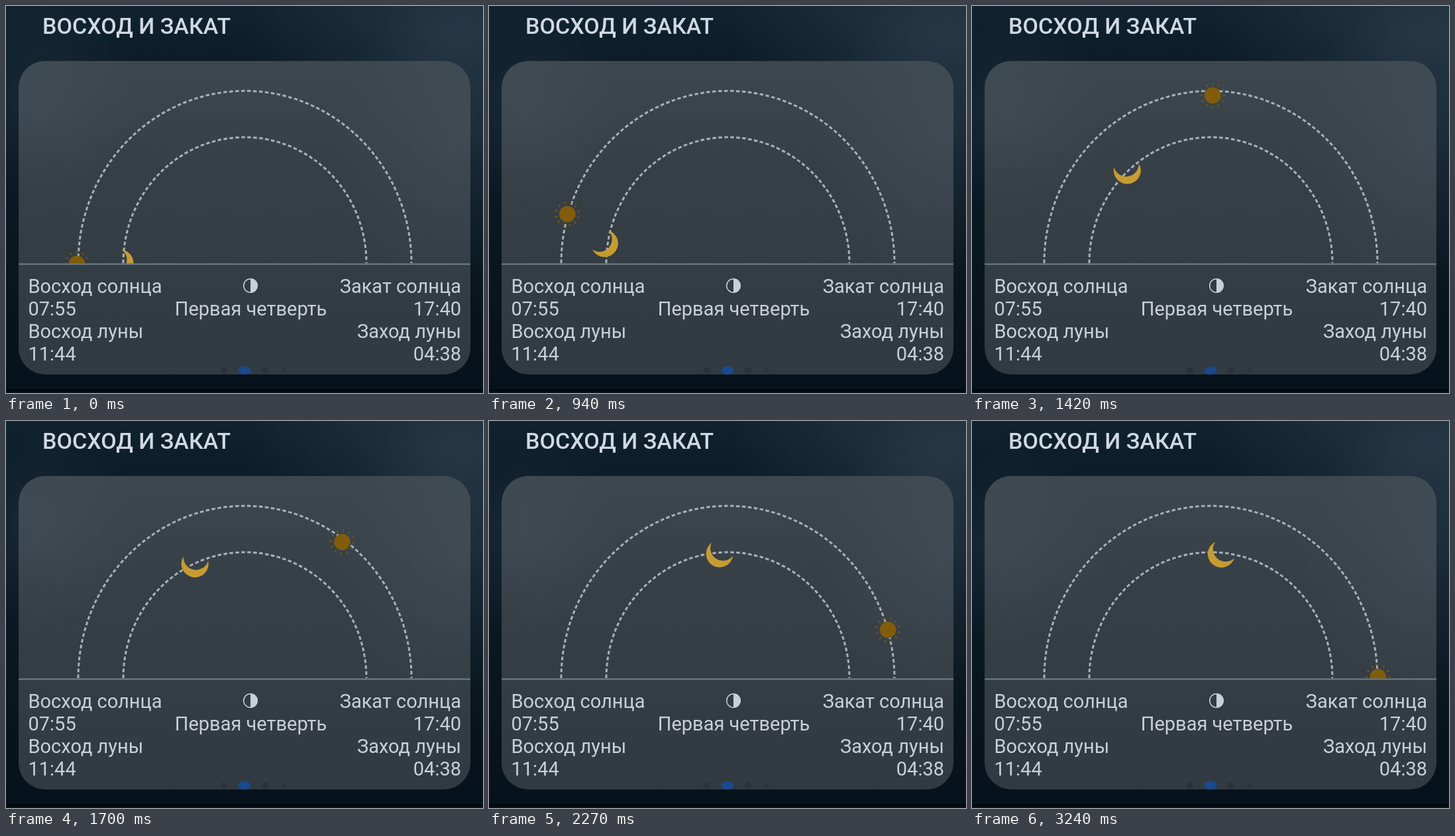
Recreate the animation shown at these times as an HTML page. Size 720 px wide and 584 px high, loop 3270 ms.

```html
<!DOCTYPE html>
<html lang="ru">
<head>
<meta charset="utf-8">
<title>Восход и закат</title>
<style>
  html, body { margin: 0; width: 100%; height: 100%; overflow: hidden; background: #07141e; }
  svg { display: block; width: 100vw; height: 100vh; }
  text { font: 29px Roboto, sans-serif; fill: #c9d0d7; }
  .title { font-size: 34px; font-weight: 500; fill: #d0d9e3; }
  .end { text-anchor: end; }
  .mid { text-anchor: middle; }
  .arc { fill: none; stroke: #a8b1b8; stroke-width: 3; stroke-dasharray: 5.5 3.5; }
</style>
</head>
<body>
<svg viewBox="0 0 720 584">
  <defs>
    <linearGradient id="sky" x2="0" y2="1">
      <stop offset="0" stop-color="#112330"/>
      <stop offset=".16" stop-color="#0b1b27"/>
      <stop offset=".6" stop-color="#091721"/>
      <stop offset="1" stop-color="#06121b"/>
    </linearGradient>
    <linearGradient id="card" x2="0" y2="1">
      <stop offset="0" stop-color="#3c474e"/>
      <stop offset=".35" stop-color="#373f46"/>
      <stop offset=".65" stop-color="#343d43"/>
      <stop offset="1" stop-color="#323a41"/>
    </linearGradient>
    <radialGradient id="glow">
      <stop offset="0" stop-color="#5b6d80" stop-opacity=".38"/>
      <stop offset="1" stop-color="#5b6d80" stop-opacity="0"/>
    </radialGradient>
    <clipPath id="above"><path d="M0 0H720V388.5H0Z"/></clipPath>
  </defs>

  <path fill="url(#sky)" d="M0 0H720V584H0Z"/>
  <ellipse fill="url(#glow)" cx="690" cy="40" rx="330" ry="190" opacity=".7"/>
  <rect fill="url(#card)" x="19" y="83" width="682" height="473" rx="40"/>
  <ellipse fill="url(#glow)" cx="690" cy="200" rx="190" ry="230" opacity=".55"/>
  <ellipse id="cloud" fill="url(#glow)" cx="50" cy="150" rx="150" ry="150" opacity=".45"/>
  <path stroke="#02080d" stroke-width="3" d="M0 580H720"/>

  <path class="arc" d="M109 388A251.5 260 0 0 1 612 388"/>
  <path class="arc" d="M177 388A183.5 190 0 0 1 544 388"/>
  <g clip-path="url(#above)">
    <g id="sun">
      <circle r="12.3" fill="#805c0b"/>
      <g id="rays" stroke="#72561a" stroke-width="2"/>
    </g>
    <path id="moon" fill="#c69c32" d="M-18.9 -8A20.5 20.5 0 1 0 18.9 -8A19 19 0 0 1 -18.9 -8Z"/>
  </g>
  <path stroke="#72808a" stroke-width="2" d="M19 389.5H701"/>

  <text class="title" x="55" y="41.5">ВОСХОД И ЗАКАТ</text>
  <text x="33.5" y="433">Восход солнца</text>
  <text x="33.5" y="467">07:55</text>
  <text x="33.5" y="501">Восход луны</text>
  <text x="33.5" y="535">11:44</text>
  <text class="end" x="687" y="433">Закат солнца</text>
  <text class="end" x="687" y="467">17:40</text>
  <text class="end" x="687" y="501">Заход луны</text>
  <text class="end" x="687" y="535">04:38</text>
  <text class="mid" x="369.5" y="467">Первая четверть</text>
  <circle cx="369" cy="422" r="10.3" fill="none" stroke="#c9d0d7" stroke-width="1.5"/>
  <path fill="#c9d0d7" d="M369 411.5A10.5 10.5 0 0 1 369 432.5Z"/>

  <g fill="#2a333a">
    <circle cx="329" cy="550" r="5"/>
    <circle cx="391" cy="550" r="5"/>
    <circle cx="419" cy="550" r="4" opacity=".7"/>
  </g>
  <ellipse cx="360" cy="550" rx="9.5" ry="6.3" fill="#1a4a8c"/>
</svg>
<script>
const LOOP = 3270, START = 540, LENGTH = 2700;
const byId = id => document.getElementById(id);
const sun = byId('sun'), moon = byId('moon'), cloud = byId('cloud');

byId('rays').innerHTML = Array.from({ length: 12 }, (_, i) =>
  `<path d="M15.5 0H19" transform="rotate(${i * 30})"/>`).join('');

// Cubic Bezier easing (.33, 0, .2, 1), solved by bisection
function ease(x) {
  if (x <= 0) return 0;
  if (x >= 1) return 1;
  let lo = 0, hi = 1, s;
  for (let i = 0; i < 24; i++) {
    s = (lo + hi) / 2;
    const bx = .99 * s * (1 - s) ** 2 + .6 * s * s * (1 - s) + s ** 3;
    if (bx < x) lo = s; else hi = s;
  }
  return s * s * (3 - 2 * s);
}

// Place a body on its arc, degrees counted from the left end of the horizon
function place(el, rx, ry, base, deg, turn) {
  const a = deg * Math.PI / 180;
  const x = 360 - rx * Math.cos(a), y = base - ry * Math.sin(a);
  el.setAttribute('transform', `translate(${x} ${y}) rotate(${turn})`);
}

function draw(now) {
  const t = now % LOOP, p = ease((t - START) / LENGTH);
  place(sun, 253, 254, 389, 179.4 * p, 179.4 * p);
  place(moon, 188, 188, 388, 95 * p, 100 * p - 60);
  cloud.setAttribute('cy', 140 + 50 * t / LOOP);
  requestAnimationFrame(draw);
}
draw(0);
</script>
</body>
</html>
```
